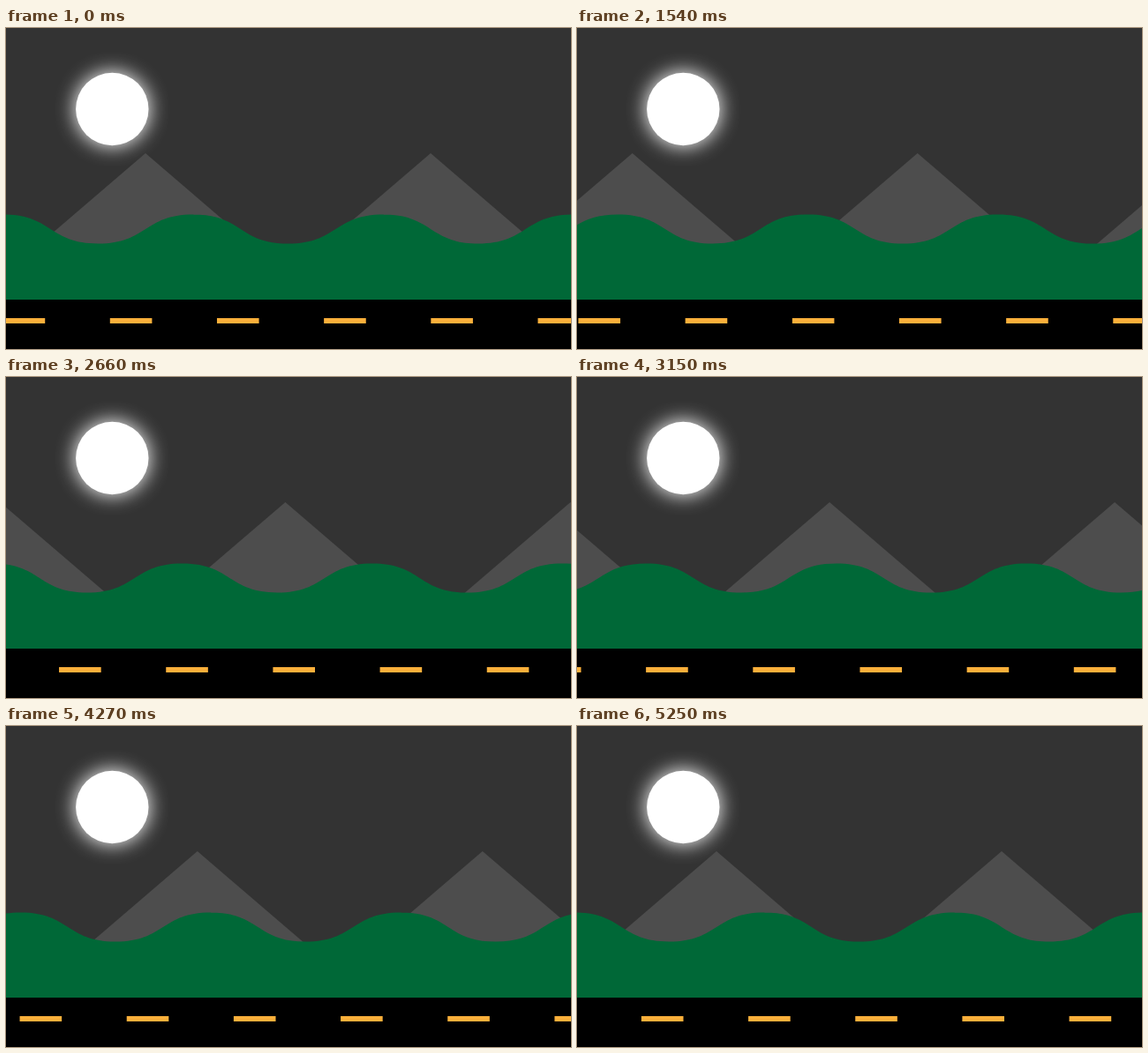
An HTML page for the animation above (5320 ms loop, 640 px wide and 364 px high).

```html
<!DOCTYPE html>
<html lang="en">
<head>
<meta charset="utf-8">
<title>Night road</title>
<style>
  html, body { margin: 0; width: 100%; height: 100%; overflow: hidden; background: #333; }
  svg { display: block; width: 100vw; height: 100vh; }
</style>
</head>
<body>
<svg viewBox="0 0 640 364" preserveAspectRatio="none">
  <defs>
    <filter id="glow" x="-100%" y="-100%" width="300%" height="300%" color-interpolation-filters="sRGB">
      <feGaussianBlur stdDeviation="11"/>
    </filter>
  </defs>
  <rect width="640" height="364" fill="#333"/>
  <circle cx="120.3" cy="92" r="42" fill="#fff" filter="url(#glow)"/>
  <circle cx="120.3" cy="92" r="41.2" fill="#fff"/>
  <path id="mountains" fill="#4d4d4d"/>
  <path id="hills" fill="#006837"/>
  <rect y="308" width="640" height="56" fill="#000"/>
  <path id="dashes" fill="#fbb03b"/>
</svg>
<script>
  const STEP_MS = 70;
  const STEPS = 76;
  const TRAVEL_STEPS = 74.57; // the scenery comes to rest just before the last step

  // Each layer repeats every `period` px and covers `travel` px per loop.
  const layers = [
    {
      id: "mountains", period: 323, start: 158, travel: 323,
      tile: x => `M${x} 142l138 118.5h-276z`
    },
    {
      id: "hills", period: 215.33, start: 212, travel: 215.33 * 6,
      tile: (x, period) => {
        const half = period / 2, near = half * 0.52, far = half - near;
        return `M${x} 211.5c${near} 0 ${far} 33 ${half} 33s${far} -33 ${half} -33` +
               `h.5V310H${x}z`;
      }
    },
    {
      id: "dashes", period: 121.17, start: 117.8, travel: 3680,
      tile: x => `M${x} 329h47.6v6h-47.6z`
    }
  ];

  for (const layer of layers) {
    layer.node = document.getElementById(layer.id);
    let d = "";
    for (let x = -layer.period; x < 640 + 2 * layer.period; x += layer.period) {
      d += layer.tile(x, layer.period);
    }
    layer.node.setAttribute("d", d);
  }

  const wrap = (value, size) => ((value % size) + size) % size;

  function render(ms) {
    const step = Math.floor(ms / STEP_MS) % STEPS;
    const progress = Math.min(step / TRAVEL_STEPS, 1);
    for (const { node, period, start, travel } of layers) {
      const x = wrap(start - travel * progress, period);
      node.setAttribute("transform", `translate(${x.toFixed(3)} 0)`);
    }
  }

  const startTime = performance.now();
  function tick(now) {
    render(Math.max(0, now - startTime));
    requestAnimationFrame(tick);
  }
  render(0);
  requestAnimationFrame(tick);
</script>
</body>
</html>
```
